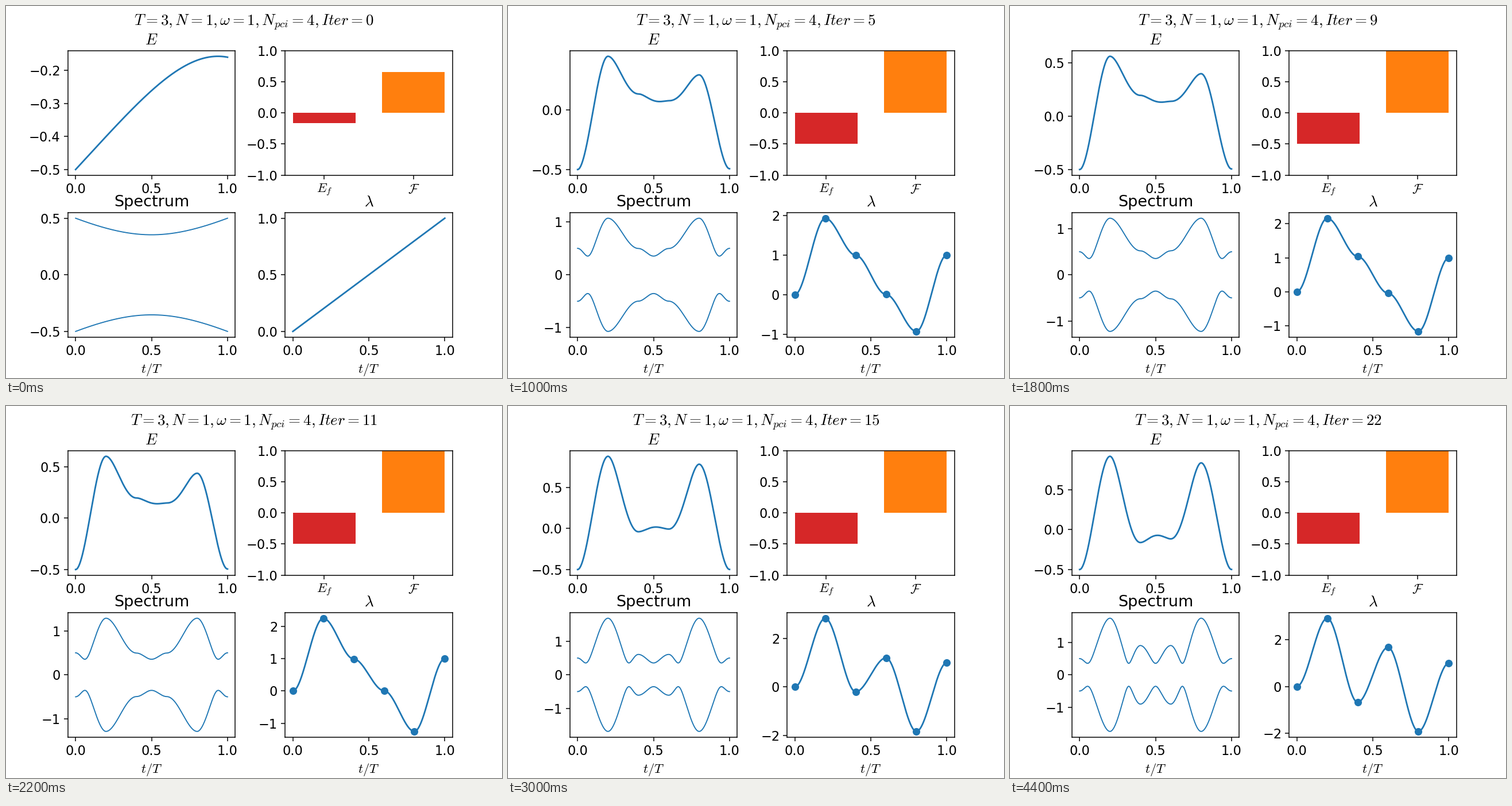
Write a matplotlib script that moves like this. It is 864 px wide and 648 px high and loops after 4.6 s.

```python
import numpy as np
import matplotlib.pyplot as plt
from matplotlib.animation import FuncAnimation

plt.rcParams.update({"font.size": 12, "font.family": "DejaVu Sans",
                     "mathtext.fontset": "cm"})

T = 3.0
STEPS = 600
s = np.linspace(0, 1, STEPS + 1)
KNOT_X = np.linspace(0, 1, 6)

# First two free knots per iteration; the other two mirror them about 0.5.
PATH = [(0.2, 0.4), (0.858, 0.639), (1.6, 0.88), (1.722, 0.93),
        (1.927, 0.995), (2.067, 1.02), (2.13, 1.035), (2.15, 1.04),
        (2.164, 1.04), (2.19, 1.03), (2.25, 0.99), (2.33, 0.9),
        (2.424, 0.765), (2.6, 0.38), (2.834, -0.2), (2.97, -0.58),
        (3.038, -0.733), (3.041, -0.736), (3.0, -0.72), (2.953, -0.695),
        (2.925, -0.68), (2.918, -0.676)]
KNOTS = [np.array([0, a, b, 1 - b, 1 - a, 1]) for a, b in PATH]


def ramp(knots, x):
    """Piecewise cubic through the knots, flat at every knot."""
    k = np.clip((x * 5).astype(int), 0, 4)
    u = x * 5 - k
    return knots[k] + (knots[k + 1] - knots[k]) * u * u * (3 - 2 * u)


def field(lam):
    return np.stack([1 - lam, np.zeros_like(lam), lam], axis=-1)


def evolve(lam, lam_mid):
    """Energy along each schedule, from Bloch vector precession."""
    b, b_mid = field(lam), field(lam_mid)
    n = np.tile([-1.0, 0.0, 0.0], (len(lam), 1))
    energy = np.empty(lam.shape)
    energy[:, 0] = 0.5 * np.sum(n * b[:, 0], axis=1)
    for i in range(STEPS):
        size = np.linalg.norm(b_mid[:, i], axis=1, keepdims=True)
        axis = b_mid[:, i] / size
        ang = size * T / STEPS
        along = np.sum(axis * n, axis=1, keepdims=True)
        n = (n * np.cos(ang) + np.cross(axis, n) * np.sin(ang)
             + axis * along * (1 - np.cos(ang)))
        energy[:, i + 1] = 0.5 * np.sum(n * b[:, i + 1], axis=1)
    return energy


mid = (s[:-1] + s[1:]) / 2
LAM = np.array([s] + [ramp(k, s) for k in KNOTS])
LAM_MID = np.array([mid] + [ramp(k, mid) for k in KNOTS])
ENERGY = evolve(LAM, LAM_MID)
GAP = 0.5 * np.hypot(1 - LAM, LAM)

fig, axes = plt.subplots(2, 2, figsize=(6.4, 4.8), dpi=135,
                         gridspec_kw={"hspace": 0.3, "wspace": 0.3})
(ax_e, ax_bar), (ax_spec, ax_lam) = axes
heading = fig.suptitle("")

ax_e.set_title("$E$")
ax_spec.set_title("Spectrum")
ax_lam.set_title(r"$\lambda$")
for ax in (ax_spec, ax_lam):
    ax.set_xlabel("$t/T$")
for ax in (ax_e, ax_spec, ax_lam):
    ax.set_xlim(-0.05, 1.05)

line_e, = ax_e.plot([], [], color="tab:blue", lw=1.5)
upper, = ax_spec.plot([], [], color="tab:blue", lw=1)
lower, = ax_spec.plot([], [], color="tab:blue", lw=1)
line_lam, = ax_lam.plot([], [], color="tab:blue", lw=1.5)
dots, = ax_lam.plot([], [], "o", color="tab:blue")

bars = ax_bar.bar([0, 1], [0, 0], width=0.7, color=["tab:red", "tab:orange"])
ax_bar.set_xlim(-0.435, 1.435)
ax_bar.set_ylim(-1, 1)
ax_bar.set_xticks([0, 1], ["$E_f$", r"$\mathcal{F}$"])


def fit(ax, lo, hi):
    pad = 0.05 * (hi - lo)
    ax.set_ylim(lo - pad, hi + pad)


def update(i):
    energy, gap, lam = ENERGY[i], GAP[i], LAM[i]
    heading.set_text(r"$T=3, N=1, \omega=1, N_{pci}=4, Iter=%d$" % i)
    line_e.set_data(s, energy)
    fit(ax_e, energy.min(), energy.max())
    upper.set_data(s, gap)
    lower.set_data(s, -gap)
    fit(ax_spec, -gap.max(), gap.max())
    line_lam.set_data(s, lam)
    fit(ax_lam, lam.min(), lam.max())
    if i:
        dots.set_data(KNOT_X, KNOTS[i - 1])
    else:
        dots.set_data([], [])
    bars[0].set_height(energy[-1])
    bars[1].set_height(0.5 - energy[-1])
    return []


anim = FuncAnimation(fig, update, frames=len(LAM), interval=200,
                     init_func=lambda: update(0), repeat=True,
                     repeat_delay=0, blit=False)
plt.show()
```
